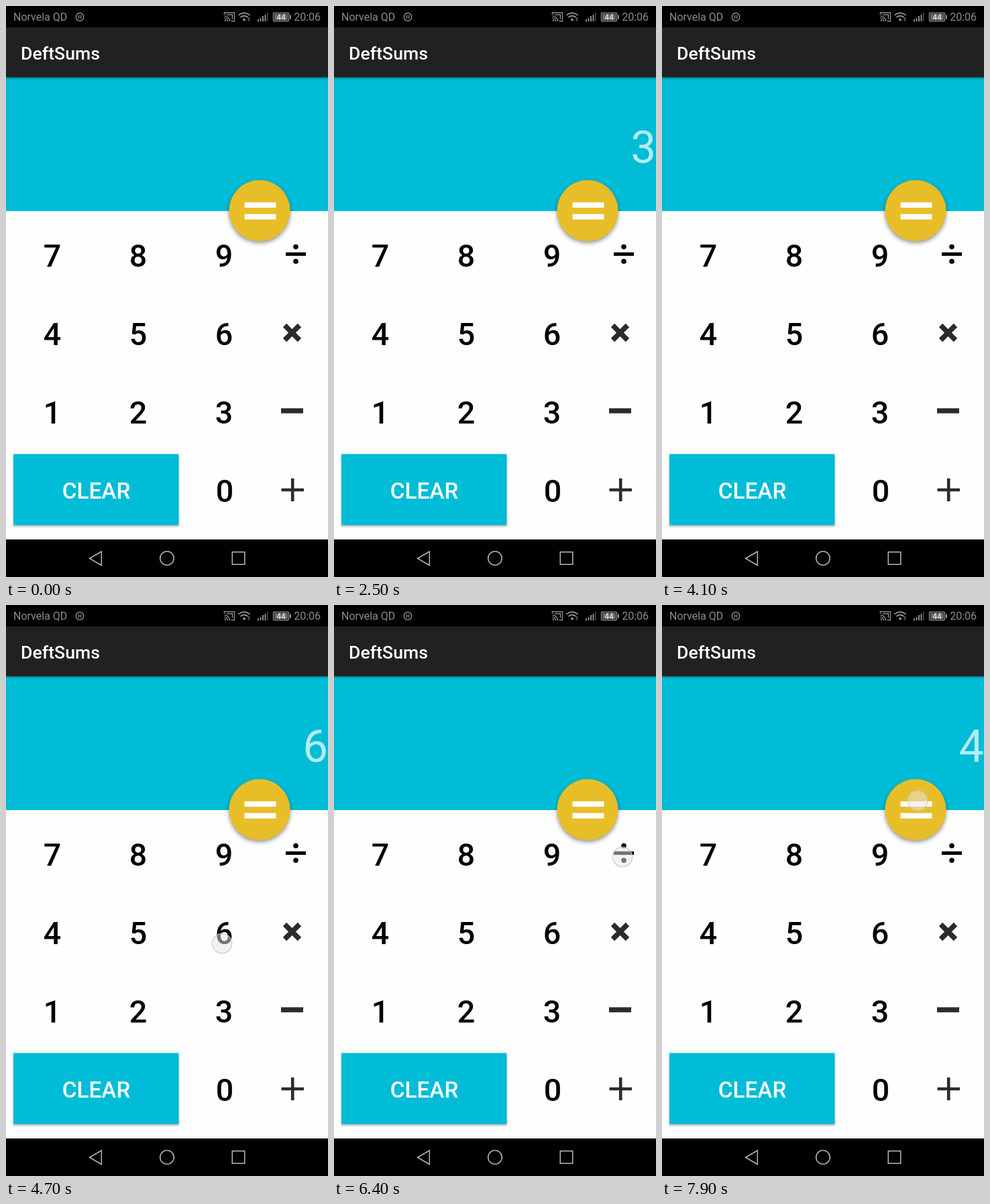
An HTML page that plays this animation: 480 by 852 pixels, repeating every 8000 ms.

```html
<!DOCTYPE html>
<html lang="en">
<head>
<meta charset="utf-8">
<title>Calculator</title>
<style>
  html, body { margin: 0; width: 100%; height: 100%; overflow: hidden; background: #fefefe; }
  svg { display: block; width: 480px; height: 852px; font-family: Roboto, sans-serif; }
  .medium { font-weight: 500; }
  .status { font-size: 16px; fill: #8c8c8c; }
  .line { fill: none; stroke: #8c8c8c; stroke-width: 1.4; }
  .nav { fill: none; stroke: #b0b0b0; stroke-width: 1.6; }
  .keys { font-size: 46.67px; text-anchor: middle; fill: #000; }
  .raised { filter: drop-shadow(0 2px 1.5px rgba(0, 0, 0, .32)); }
  .floating { filter: drop-shadow(0 3px 3px rgba(0, 0, 0, .42)); }
</style>
</head>
<body>
<svg viewBox="0 0 480 852">
  <defs>
    <linearGradient id="shade" x2="0" y2="1">
      <stop stop-opacity=".25"/>
      <stop offset="1" stop-opacity="0"/>
    </linearGradient>
  </defs>
  <rect width="480" height="852" fill="#fefefe"/>

  <!-- Status bar -->
  <rect width="480" height="32"/>
  <g class="status">
    <text x="11" y="22">Norvela QD</text>
    <text x="469" y="22" text-anchor="end">20:06</text>
    <rect x="400" y="12" width="20" height="9" fill="#666"/>
    <text x="410" y="20.8" text-anchor="middle" font-size="12" font-weight="500" style="fill:#ddd">44</text>
    <path d="M375 23v-3h2v3zM378.5 23v-5h2v5zM382 23v-8h2v8zM385.5 23v-10h2v10z"/>
    <path d="M389 23V10h1.6v13z" opacity=".5"/>
    <circle cx="355" cy="20.5" r="2"/>
    <path d="M360 19l2-2 2 2zM360 20.5l2 2 2-2z"/>
  </g>
  <g class="line">
    <circle cx="110" cy="16.3" r="5.8"/>
    <path d="M108.5 13.5v5.6M111.6 13.5v5.6"/>
    <path d="M325.5 13v-3h15v12.5h-5M325.5 15a8 8 0 0 1 8 8M325.5 18a5 5 0 0 1 5 5M325.5 21a2 2 0 0 1 2 2M329 13h8.5v6.5"/>
    <path d="M346.5 13.8q8.5-7 17 0M349.3 17q5.7-4.5 11.4 0" stroke-width="1.8"/>
    <rect x="398.5" y="10.5" width="23" height="12" rx="1"/>
    <path d="M424 13.5v6" stroke-width="2"/>
  </g>

  <!-- Title bar and display -->
  <rect y="106" width="480" height="200" fill="#00bcd6"/>
  <rect y="32" width="480" height="74.5" fill="#212121"/>
  <rect y="106.5" width="480" height="4" fill="url(#shade)"/>
  <text class="medium" x="22" y="79.5" font-size="26.67" fill="#fff">DeftSums</text>
  <text id="display" x="480" y="233.5" font-size="66.67" text-anchor="end" fill="#fff" fill-opacity=".7"></text>

  <!-- Keypad -->
  <g id="keys" class="keys medium"></g>
  <path d="M417 367.6h30v5.2h-30z"/>
  <circle cx="432" cy="359.2" r="3.8"/>
  <circle cx="432" cy="381" r="3.8"/>
  <g fill="none" stroke="#2b2b2b">
    <path d="M415.5 476.5l22 22m0-22l-22 22" stroke-width="7.6"/>
    <path d="M410 604h33" stroke-width="7.6"/>
    <path d="M410.5 722h33.500M427.200 705v34" stroke-width="4.6"/>
  </g>
  <rect class="raised" x="11" y="668.5" width="246.500" height="106" fill="#00bcd6"/>
  <text class="medium" x="134.5" y="734.7" font-size="33.33" text-anchor="middle" fill="#fff">CLEAR</text>
  <circle class="floating" cx="378" cy="305.3" r="45.5" fill="#e8be28"/>
  <path d="M355.5 293h47v8h-47zM355.5 310.500h47v8h-47z" fill="#fff"/>

  <!-- Navigation bar -->
  <rect y="796" width="480" height="56"/>
  <g class="nav">
    <path d="M142.300 814v20.500L124.500 824.200z"/>
    <circle cx="240" cy="824" r="10.300"/>
    <rect x="337.300" y="814.700" width="18.500" height="18.500"/>
  </g>

  <circle id="touch" r="14.700" fill="#e6e6e6" fill-opacity=".5" stroke="#c8c8c8" stroke-opacity=".7" stroke-width="1.600"/>
</svg>
<script>
const LOOP = 8000;
const TOUCH_TIME = 200;
const RESPONSE_DELAY = 100;

// Each press: start time, finger position, resulting display text
const presses = [
  [800, 197, 500, "5"],
  [1600, 427, 608, ""],
  [2300, 320, 608, "3"],
  [2900, 381, 296, "2"],
  [3900, 427, 492, ""],
  [4600, 322, 505, "6"],
  [5300, 381, 296, "12"],
  [6300, 430, 376, ""],
  [7000, 319, 608, "3"],
  [7800, 381, 292, "4"],
];

const display = document.getElementById("display");
const touch = document.getElementById("touch");

const addKey = (label, x, y) => {
  const key = document.createElementNS("http://www.w3.org/2000/svg", "text");
  key.setAttribute("x", x);
  key.setAttribute("y", y);
  key.textContent = label;
  document.getElementById("keys").append(key);
};
[..."789456123"].forEach((label, i) =>
  addKey(label, 69 + 128 * (i % 3), 388.5 + 117.2 * Math.floor(i / 3)));
addKey("0", 326, 740);

function draw(now) {
  const time = now % LOOP;
  const answered = presses.filter(([start]) => time >= start + RESPONSE_DELAY).pop();
  const held = presses.find(([start]) => time >= start && time < start + TOUCH_TIME);
  display.textContent = answered ? answered[3] : "";
  touch.style.display = held ? "" : "none";
  if (held) {
    touch.setAttribute("cx", held[1]);
    touch.setAttribute("cy", held[2]);
  }
  requestAnimationFrame(draw);
}
draw(performance.now());
</script>
</body>
</html>
```
